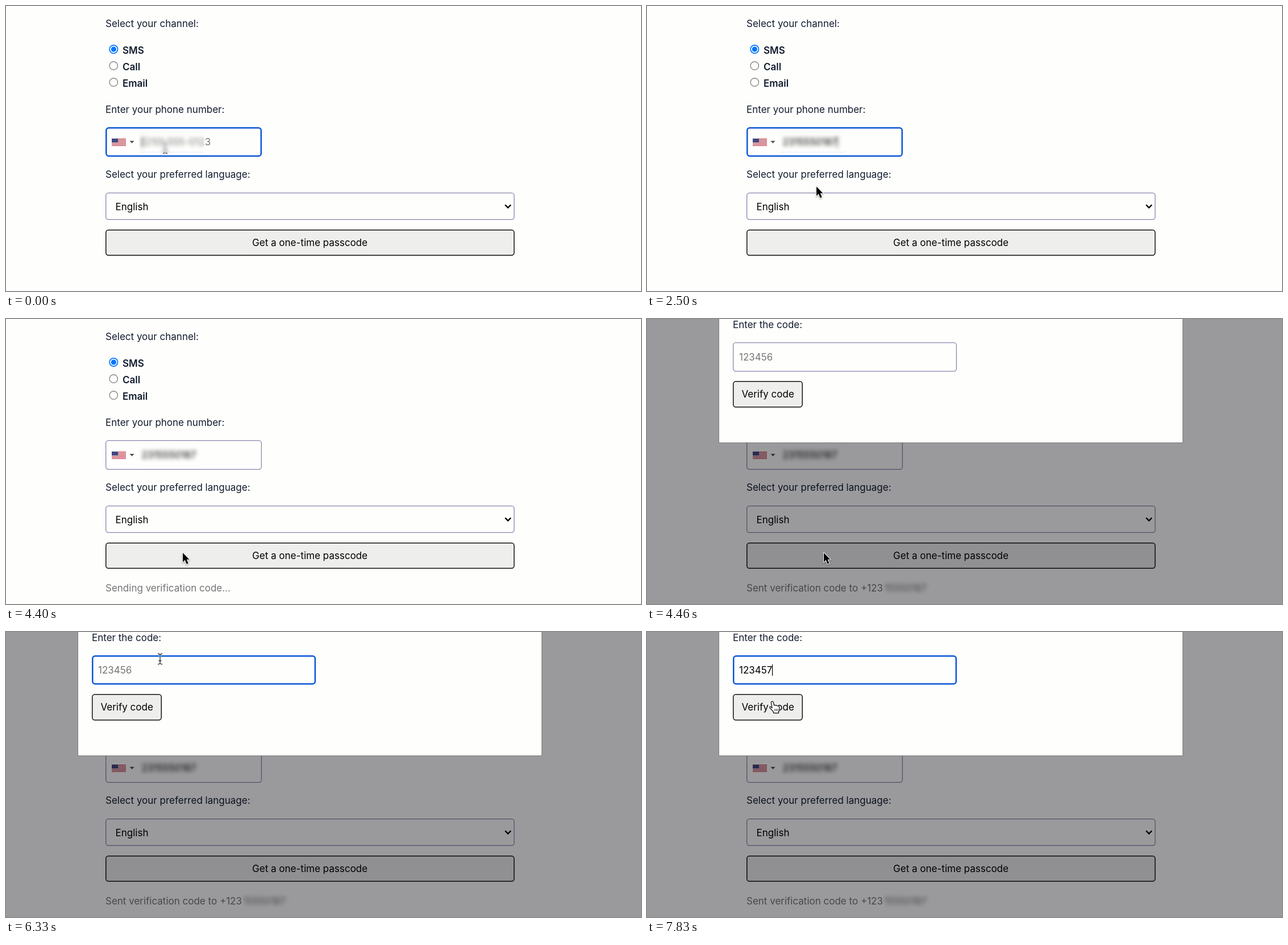
These frames come from a looping animation (1117 px wide and 501 px high, 8 s). An HTML page with a canvas:

```html
<!DOCTYPE html>
<html lang="en">
<head>
<meta charset="utf-8">
<title>Passcode form</title>
<style>
html, body { margin: 0; width: 100%; height: 100%; overflow: hidden; background: #fefefd; }
canvas { display: block; }
</style>
</head>
<body>
<canvas id="stage" width="1117" height="501"></canvas>
<script>
const c = document.getElementById('stage').getContext('2d');
const LOOP = 8000, MODAL = 4460;
const PAGE = '#fefefd', INK = '#121c2d', GREY = '#757575', FOCUS = '#0b57d6', LINE = '#8788ae';
const PHONE = '2315550187', CODE = '123457';
const phoneKeys = [300, 560, 800, 1060, 1300, 1500, 1700, 1800, 2060, 2260];
const codeKeys = [6660, 6800, 6900, 7100, 7330, 7560];

// Pointer stops: time, x, y
const stops = [
  [2300, 280, 250], [2400, 287, 275], [2500, 298, 317], [2620, 306, 370], [2800, 311, 411],
  [4960, 311, 411], [5020, 306, 368], [5200, 277, 72], [5260, 272, 35],
  [5660, 272, 35], [5780, 271, 47.5], [7600, 271, 47.5], [7700, 250, 80], [7830, 221, 122]
];

const arrow = new Path2D('M0 0V16.2L3.8 12.7L6.7 19.8L9.6 18.5L6.7 11.7H11.5Z');
const beam = new Path2D('M-4-9.3Q-1-9.3 0-7.3Q1-9.3 4-9.3M0-7.3V7.3M-4 9.3Q-1 9.3 0 7.3Q1 9.3 4 9.3M-2.5 3H2.5');
const hand = new Path2D('M-2.6 2.5Q-2.6 0-.6 0Q1 0 1.5 2L2.6 7Q4 5.5 5.5 7.5Q7 6 8.5 8Q11 6.8 11.5 9.5L12 14Q12 16.5 10.5 18V20.5H2Q1.5 18-1 15.5L-5 11.5Q-6 9-3.5 9.5L-1 11.5Z');
const creases = new Path2D('M4 13V17M6.5 13V17M9 13V17');

const typed = (str, keys, t) => str.slice(0, keys.filter(k => k <= t).length);

function text(str, x, y, color = INK, weight = 400) {
  c.font = `${weight} 17px Inter, sans-serif`;
  c.fillStyle = color;
  c.fillText(str, x, y);
}

function box(x, y, w, h, line, color, fill) {
  c.beginPath();
  c.roundRect(x + line / 2, y + line / 2, w - line, h - line, 4.5);
  if (fill) { c.fillStyle = fill; c.fill(); }
  c.lineWidth = line;
  c.strokeStyle = color;
  c.stroke();
}

function input(x, y, w, h, textX, value, hint, focused, caret) {
  box(x, y, w, h, focused ? 2.5 : 1.3, focused ? FOCUS : LINE);
  const base = y + h / 2 + 6.2;
  text(value || hint, textX, base, value ? '#000' : GREY);
  if (caret) {
    c.fillStyle = '#000';
    c.fillRect(Math.round(textX + (value ? c.measureText(value).width : 0)), base - 16, 1.2, 20);
  }
}

function radio(y, label, on) {
  c.beginPath();
  c.arc(189.3, y, 7.2, 0, 7);
  c.lineWidth = on ? 1.7 : 1.2;
  c.strokeStyle = on ? '#0075ff' : GREY;
  c.stroke();
  if (on) {
    c.beginPath();
    c.arc(189.3, y, 4.6, 0, 7);
    c.fillStyle = '#0075ff';
    c.fill();
  }
  text(label, 205, y + 7.5, INK, 600);
}

function flag() {
  for (let i = 0; i < 13; i++) {
    c.fillStyle = i % 2 ? '#f4eeee' : '#c23b4d';
    c.fillRect(186, 233 + i, 25, 1);
  }
  c.fillStyle = '#43477f';
  c.fillRect(186, 233, 11, 7);
  c.fillStyle = '#555';
  c.fill(new Path2D('M217.5 237H225.5L221.5 241.5Z'));
}

function phoneField(t) {
  const focused = t < 2930;
  const caret = focused && (t < 100 || t >= 300 && t < 2760);
  input(175, 213, 275, 52, 238.5, typed(PHONE, phoneKeys, t), '(210) 555-0123', focused, caret);
}

function blurred(x, y, w, h, draw) {
  c.save();
  c.beginPath();
  c.rect(x, y, w, h);
  c.clip();
  c.fillStyle = PAGE;
  c.fillRect(x, y, w, h);
  c.filter = 'blur(3.5px)';
  draw();
  c.restore();
}

function pointerAt(t) {
  if (t < 330) return [280, 250];
  if (t < 2300 || t >= 6700 && t < 7600) return null;
  const i = stops.findIndex(s => s[0] > t);
  if (i < 0) return stops.at(-1).slice(1);
  const [t0, x0, y0] = stops[i - 1], [t1, x1, y1] = stops[i];
  const k = (t - t0) / (t1 - t0);
  return [x0 + (x1 - x0) * k, y0 + (y1 - y0) * k];
}

function pointer(t) {
  const p = pointerAt(t);
  if (!p) return;
  const [x, y] = p, early = t < 4400;
  const overInput = early ? y < 265 : y > 41 && y < 92;
  const overButton = early ? y > 393 : x < 274 && y > 109 && y < 155;
  c.save();
  c.translate(x, y);
  c.lineJoin = 'round';
  if (overInput) {
    c.strokeStyle = '#fff';
    c.lineWidth = 2.6;
    c.stroke(beam);
    c.strokeStyle = '#333';
    c.lineWidth = 1.4;
    c.stroke(beam);
  } else if (overButton) {
    c.fillStyle = '#fff';
    c.fill(hand);
    c.strokeStyle = '#222';
    c.lineWidth = 1.4;
    c.stroke(hand);
    c.lineWidth = 1;
    c.stroke(creases);
  } else {
    c.shadowColor = 'rgba(0,0,0,.35)';
    c.shadowBlur = 3;
    c.shadowOffsetY = 1.5;
    c.strokeStyle = '#fff';
    c.lineWidth = 2;
    c.stroke(arrow);
    c.shadowColor = 'transparent';
    c.fillStyle = '#000';
    c.fill(arrow);
  }
  c.restore();
}

function form(t) {
  text('Select your channel:', 175, 37.3);
  radio(76, 'SMS', true);
  radio(105, 'Call');
  radio(134, 'Email');
  text('Enter your phone number:', 175, 188);
  flag();
  phoneField(t);
  text('Select your preferred language:', 175, 302);
  box(175, 328, 719.5, 48, 1.3, LINE);
  text('English', 192.5, 358.5, '#000');
  c.strokeStyle = '#000';
  c.lineWidth = 2.4;
  c.stroke(new Path2D('M878 349.5L883 354.5L888 349.5'));
  box(175, 393, 719.5, 46, 1.5, '#111', '#eeeeed');
  c.textAlign = 'center';
  text('Get a one-time passcode', 534.5, 422, '#000');
  c.textAlign = 'left';
  if (t >= MODAL) {
    text('Sent verification code to +123', 175, 479, GREY);
    blurred(416, 458, 90, 32, () => text('15550187', 417, 479, GREY));
  } else if (t >= 3030) {
    text('Sending verification code...', 175, 479, GREY);
  }
}

function modal(t) {
  c.fillStyle = 'rgba(2,0,8,.395)';
  c.fillRect(0, 0, 1117, 501);
  c.fillStyle = '#7f7f80';
  c.fillRect(126, 0, 817, 218);
  c.fillStyle = PAGE;
  c.fillRect(127, 0, 815, 217);
  text('Enter the code:', 151, 15.7);
  const focused = t >= 5830;
  const caret = focused && (t < 6330 || t >= 6660);
  input(151, 41, 394, 51.5, 162, typed(CODE, codeKeys, t), '123456', focused, caret);
  box(151, 109, 123, 46.5, 1.5, '#111', '#eeeeed');
  text('Verify code', 166.5, 138.3, '#000');
}

function frame() {
  const t = performance.now() % LOOP, open = t >= MODAL;
  c.fillStyle = PAGE;
  c.fillRect(0, 0, 1117, 501);
  form(t);
  if (!open) pointer(t);
  blurred(234, 221, 114, 37, () => {
    phoneField(t);
    if (t < 2500) pointer(t);
  });
  if (open) {
    modal(t);
    pointer(t);
  }
  requestAnimationFrame(frame);
}
frame();
</script>
</body>
</html>
```
